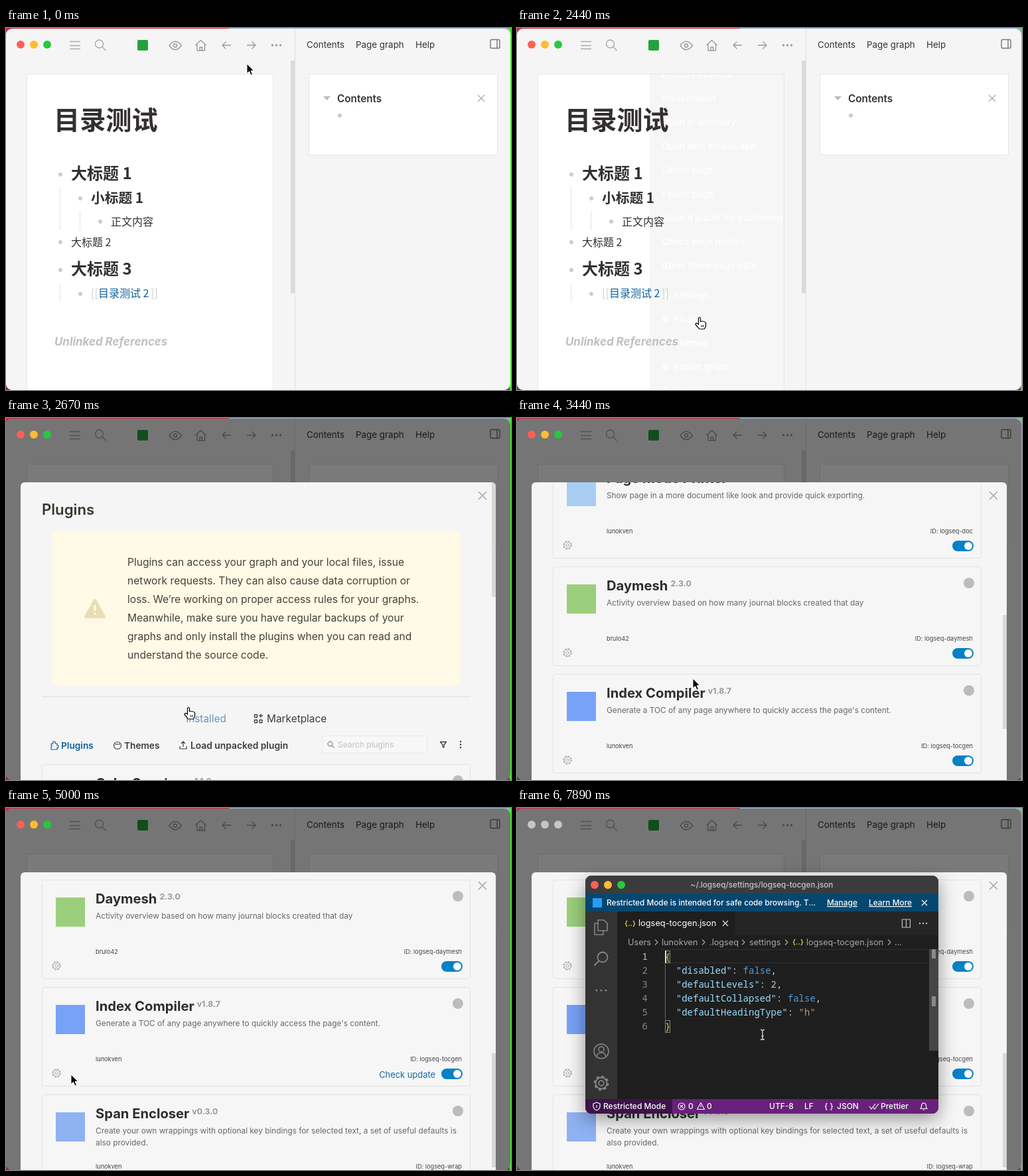
An HTML page that plays this animation: 761 by 546 pixels, repeating every 8 s.

```html
<!DOCTYPE html>
<html lang="zh-CN">
<head>
<meta charset="utf-8">
<style>
html, body { margin: 0; width: 100%; height: 100%; overflow: hidden; background: #f5f5f5; }
svg { display: block; width: 761px; height: 546px; }
text { font-family: Inter, "Noto Sans CJK SC", sans-serif; }
.zh { font-family: "Noto Sans CJK SC", "Noto Sans CJK", sans-serif; }
.mono { font-family: "Noto Sans Mono", monospace; }
#editor { filter: drop-shadow(0 8px 14px rgba(0, 0, 0, .4)); }
</style>
</head>
<body>
<script>
const $ = id => document.getElementById(id);

// Drawing helpers: each returns SVG markup.
const text = (x, y, size, fill, str, weight = 400, extra = '') =>
  `<text x="${x}" y="${y}" font-size="${size}" ${fill && `fill="${fill}"`} font-weight="${weight}" ${extra}>${str}</text>`;
const zh = (x, y, size, str, weight = 400, fill = '#332f33') => text(x, y, size, fill, str, weight, 'class="zh"');
const mono = (x, y, fill, str, extra = '') => text(x, y, 14, fill, str, 500, 'class="mono" ' + extra);
const rect = (x, y, w, h, fill, r = 0, extra = '') =>
  `<rect x="${x}" y="${y}" width="${w}" height="${h}" fill="${fill}" rx="${r}" ${extra}/>`;
const dot = (x, y, r, fill) => `<circle cx="${x}" cy="${y}" r="${r}" fill="${fill}"/>`;
const ring = (x, y, r, color, w = 1.4, extra = '') =>
  `<circle cx="${x}" cy="${y}" r="${r}" fill="none" stroke="${color}" stroke-width="${w}" ${extra}/>`;
const line = (d, color, w = 1.4, extra = '') =>
  `<path d="${d}" fill="none" stroke="${color}" stroke-width="${w}" stroke-linejoin="round" ${extra}/>`;
const cross = (x, y, r, color, w = 1.4) =>
  line(`M${x - r} ${y - r}l${2 * r} ${2 * r}m0 ${-2 * r}l${-2 * r} ${2 * r}`, color, w);
const gear = (x, y, r, color, w = 1.2) =>
  ring(x, y, r * .85, color, w) + ring(x, y, r, color, w * 1.5, `stroke-dasharray="${r * .4} ${r * .385}"`) + ring(x, y, r * .38, color, w);
// A negative side puts the handle at the lower left.
const lens = (x, y, r, color, w = 1.4, side = 1) =>
  ring(x, y, r, color, w) + line(`M${x + side * r * .7} ${y + r * .7}l${side * r} ${r}`, color, w);
const lights = (x, y, colors = ['#fe5f57', '#febc2e', '#28c840']) =>
  colors.map((c, i) => dot(x + 20 * i, y, 6, c)).join('');
const dots = (x, y, gap, r, color) => [-1, 0, 1].map(i => dot(x + i * gap, y, r, color)).join('');

function desktop() {
  return rect(0, 0, 336, 546, '#c0304a') + rect(336, 0, 425, 546, '#94aecb') +
    rect(0, 530, 761, 16, '#8f2440') + rect(759, 0, 2, 546, '#35ff20') +
    rect(0, 1, 760, 545, '#f5f5f5', 9);
}

function toolbar() {
  const c = '#9b9b9b';
  return line('M96 20.5h16M96 26.5h16M96 31.5h16', '#ababab', 1.3) + lens(140.5, 24, 6, '#ababab') +
    rect(198, 18, 16, 16, '#22a33c', 2) +
    line('M246 26.5Q255 14 264.5 26.5Q255 39 246 26.5Z', c) + ring(255, 26.5, 2.5, c) +
    line('M285.5 26l8-7.5 8 7.5M288 24.5v9.5h11.5v-9.5M292 34v-5h3.5v5', c) +
    line('M339 26h-13m5.5-5.5L326 26l5.5 5.5M363 26h13m-5.5-5.5L376 26l-5.5 5.5', c) +
    dots(407.5, 26, 6, 1.7, c) +
    text(453, 30, 13.4, '#333', 'Contents') + text(527, 30, 13.4, '#333', 'Page graph') + text(617, 30, 13.4, '#333', 'Help') +
    line('M732 17.5h10q2 0 2 2v9q0 2-2 2h-10q-2 0-2-2v-9q0-2 2-2M740 17.5v13', '#777');
}

function sidebar() {
  return line('M435.5 1v545', '#e0e0e0', 1) + rect(429, 49, 6, 351, '#dadada') +
    rect(456.5, 69.5, 284, 122, '#fff', 0, 'stroke="#e6e6e6"') +
    '<path d="M478 103h11l-5.5 6z" fill="#bbb"/>' + text(499, 112, 15.3, '#333', 'Contents', 600) +
    cross(716, 106, 5, '#aaa', 1.2) + dot(503, 132, 3, '#ccc');
}

function notes() {
  const bullets = [[82, 221], [112, 257], [142, 292], [82, 323], [82, 365], [112, 401]];
  return zh(72, 153, 39.2, '目录测试', 700) + bullets.map(([x, y]) => dot(x, y, 3, '#ccc')).join('') +
    line('M81.5 240v65M111.5 276v29M81.5 386v28', '#e4e4e4', 1) +
    zh(98, 228, 24, '大标题 1', 700) + zh(128, 263.5, 20.7, '小标题 1', 700) + zh(158, 298, 16, '正文内容') +
    zh(98, 329, 16, '大标题 2') + zh(98, 372, 24, '大标题 3', 700) +
    zh(128, 406, 16, '[[', 400, '#ccc') + zh(139, 406, 16, '目录测试 2', 400, '#10609c') + zh(218, 406, 16, ']]', 400, '#ccc') +
    text(73, 479, 16.9, '#c0c0c0', 'Unlinked References', 700, 'font-style="italic"');
}

// Text in the menu inherits its colour from the <use> element.
function menu() {
  const actions = ['Add to Favorites', 'Presentation', 'Open in directory', 'Open with default app', 'Delete page',
    'Export page', 'Make it public for publishing', 'Check page history', '(Dev) Show page data'];
  const tools = ['Settings', 'Plugins', 'Themes', 'Export graph', 'Import'];
  return rect(200, 46, 227, 520, '#f6f6f6', 4) +
    actions.map((s, i) => text(218, 75 + 36 * i, 13.5, '', s, 500)).join('') +
    '<rect x="200" y="380" width="227" height="1" opacity=".4"/>' +
    tools.map((s, i) => `<rect x="219" y="${398 + 36 * i}" width="10" height="10" rx="3" opacity=".6"/>` +
      text(236, 408 + 36 * i, 13.5, '', s, 500)).join('');
}

function pluginHeader() {
  const warning = ['Plugins can access your graph and your local files, issue',
    'network requests. They can also cause data corruption or', 'loss. We’re working on proper access rules for your graphs.',
    'Meanwhile, make sure you have regular backups of your', 'graphs and only install the plugins when you can read and',
    'understand the source code.'];
  const blue = '#10609c', ink = '#3c3c3c';
  return text(54, 146, 22.2, '#3a372f', 'Plugins', 600) + rect(70, 170, 615, 234, '#fff9e5', 3) +
    '<path d="M134 275l14 25h-28z" fill="#eadcb4" stroke="#eadcb4" stroke-width="4" stroke-linejoin="round"/>' +
    line('M134 282v9m0 3v3', '#fff9e5', 3) +
    warning.map((s, i) => text(183, 223 + 28 * i, 15.6, '#45423c', s)).join('') +
    line('M54 420.5h646', '#dedede', 1) + text(271, 459, 15.4, '#6c95bd', 'Installed') +
    line('M374.5 447.5h4v4h-4zM374.5 455.5h4v4h-4zM382 455.5h4v4h-4zM384 446v6m-3-3h6', ink, 1.3) +
    text(393, 459, 15.4, ink, 'Marketplace') +
    line('M68 491h3q-1-4 2-3 2 0 1 3h3v3q3-1 2 2 0 2-2 1v3h-9v-4q3-2 0-3z', blue, 1.2) + text(83, 499, 13.7, blue, 'Plugins', 600) +
    ring(168, 494, 5.5, ink, 1.2) + dots(168, 492, 2.5, .9, ink) + text(178, 499, 13.7, ink, 'Themes', 600) +
    line('M262 495v4h10v-4M267 496v-8m-3 3l3-3 3 3', ink, 1.2) + text(278, 499, 13.8, ink, 'Load unpacked plugin', 600) +
    rect(477.5, 479.5, 157, 26, '#f7f7f7', 3, 'stroke="#e8e8e8"') + lens(488.5, 491.5, 3.5, '#999') +
    text(500, 497, 12, '#c0c0c0', 'Search plugins') +
    line('M654.5 488.5h9l-3.5 4.5v4l-2-1v-3z', ink, 1.3) + [488, 492.5, 497].map(y => dot(685, y, 1.2, ink)).join('');
}

const CARD_TOP = 522, CARD_STEP = 162;
const plugins = [
  ['#9a9a9a', 'Calm Sessions', '1.1.2', ['Keep a set of open pages and come back to them later.'], 'brulo42', 'logseq-calm'],
  ['#a9cdf2', 'Page Mode Printer', '1.4.0', ['Show page in a more document like look and provide quick exporting.'], 'lunokven', 'logseq-doc'],
  ['#9ccf7c', 'Daymesh', '2.3.0', ['Activity overview based on how many journal blocks created that day'], 'brulo42', 'logseq-daymesh'],
  ['#78a2f8', 'Index Compiler', 'v1.8.7', ["Generate a TOC of any page anywhere to quickly access the page's content."], 'lunokven', 'logseq-tocgen'],
  ['#8fb2f2', 'Span Encloser', 'v0.3.0', ['Create your own wrappings with optional key bindings for selected text, a set of useful defaults is', 'also provided.'], 'lunokven', 'logseq-wrap'],
];

function pluginCard([color, name, version, lines, author, id], i) {
  return `<g transform="translate(0 ${CARD_TOP + CARD_STEP * i})">` +
    rect(54.5, .5, 645, 149, '#f6f6f6', 4, 'stroke="#e2e2e2"') + rect(75, 27, 44, 44, color) +
    text(135, 36, 20.2, '#2e2e2e', `${name}<tspan dx="4" dy="-6" font-size="12.3" fill="#999">${version}</tspan>`, 700) +
    lines.map((s, n) => text(135, 59 + 18 * n, 11.83, '#686868', s)).join('') +
    text(135, 112, 9.2, '#444', author) + text(687, 112, 9.2, '#444', 'ID: ' + id, 400, 'text-anchor="end"') +
    gear(76, 130, 6, '#aaa', 1) + dot(681, 25, 8, '#bcbcbc') +
    rect(656, 123, 32, 16, '#0581c7', 8) + dot(680, 131, 6, '#fff') +
    text(647, 137, 12.9, '#106ba3', 'Check update', 400, `id="update${i}" text-anchor="end"`) + '</g>';
}

function dropdown() {
  return rect(64, 408, 122, 76, '#f7f7f7', 3, 'style="filter:drop-shadow(0 1px 1px #0003)"') + gear(76, 400, 6, '#333', 1) +
    ['Open settings', 'Open package', 'Uninstall'].map((s, i) => text(71, 424 + 25 * i, 10.7, '#444', s, 600, `id="option${i}"`)).join('');
}

function editor() {
  const file = 'logseq-tocgen.json', grey = '#a9a9a9', icon = '#858585';
  const json = (x, y) => text(x, y, 11, '#cbcb41', '{..}', 600);
  const crumbs = [[167, 'Users'], [218, 'lunokven'], [290, '.logseq'], [350, 'settings'], [436, file], [569, '...']];
  return '<clipPath id="frame">' + rect(103, 102, 532, 359, '#000', 9) + '</clipPath><g clip-path="url(#frame)">' +
    rect(103, 102, 532, 359, '#1e1e1e') + rect(103, 102, 532, 27, '#3b3b3d') + lights(117, 116) +
    text(369, 120, 11.7, '#c8c8c8', '~/.logseq/settings/' + file, 500, 'text-anchor="middle"') +
    rect(103, 129, 532, 27, '#06476f') + rect(114, 136, 14, 14, '#2a9df4') +
    text(135, 147, 11.8, '#fff', 'Restricted Mode is intended for safe code browsing. T...', 500) +
    text(467, 147, 11.9, '#fff', 'Manage', 500, 'text-decoration="underline"') +
    text(530, 147, 11.9, '#fff', 'Learn More', 500, 'text-decoration="underline"') + cross(614, 143, 4, '#fff', 1.2) +
    rect(103, 156, 48, 283, '#333') + rect(329, 156, 306, 36, '#252526') +
    line('M122 169h9l5 5v11h-14zM122 174h-5v17h13v-6', icon, 1.6) + lens(129, 225, 7.5, icon, 1.8, -1) +
    dots(127, 275, 7, 1.6, icon) + ring(127, 367, 11, icon, 1.6) + ring(127, 364, 4, icon, 1.6) +
    line('M120 375q1-6 7-6t7 6', icon, 1.6) + gear(127, 415, 10, icon, 1.8) +
    json(162, 178) + text(183, 178, 12.8, '#fff', file) + cross(314, 174, 4, '#ddd', 1.3) +
    line('M580.5 168h12v12h-12zM586.5 168v12', '#c5c5c5', 1.2) + dots(612, 174, 5, 1.2, '#c5c5c5') +
    crumbs.map(([x, s]) => text(x, 207, 12.7, grey, s)).join('') + json(415, 206) +
    [208, 279, 339, 404, 559].map(x => line(`M${x} 198.5l4 4-4 4`, grey, 1.1)).join('') +
    rect(217, 213, 405, 1, '#303030') + rect(217, 233, 405, 1, '#303030') +
    rect(621, 213, 14, 153, '#454545') + rect(625, 213, 6, 14, '#8a8a8a') + rect(625, 284, 6, 15, '#8a8a8a') +
    `<g id="code">${code()}</g>` + statusBar() + '</g>';
}

function code() {
  const gold = '#ffd700';
  const entries = [['disabled', 'false', '#569cd6'], ['defaultLevels', '2', '#b5cea8'],
    ['defaultCollapsed', 'false', '#569cd6'], ['defaultHeadingType', '"h"', '#ce9178']];
  return [1, 2, 3, 4, 5, 6].map(n => mono(197, 208 + 21 * n, n > 1 ? '#858585' : '#c6c6c6', n, 'text-anchor="end"')).join('') +
    [215, 320].map(y => rect(223.5, y + .5, 7, 18, 'none', 0, 'stroke="#888"')).join('') +
    mono(223, 229, gold, '{') + mono(223, 334, gold, '}') + rect(223, 235, 1, 84, '#7d6a26') + rect(223, 215, 2, 19, '#ddd') +
    entries.map(([key, value, color], i) => mono(239.8, 250 + 21 * i, '#d4d4d4',
      `<tspan fill="#9cdcfe">"${key}"</tspan>: <tspan fill="${color}">${value}</tspan>${i < 3 ? ',' : ''}`)).join('');
}

function statusBar() {
  const label = (x, s) => text(x, 454, 12, '#fff', s, 500);
  return rect(103, 439, 532, 22, '#68217a') + rect(103, 439, 131, 22, '#3d1449') +
    line('M120 444l5 2v4q0 4-5 6-5-2-5-6v-4zM120 448v4', '#fff', 1.2) + label(130, 'Restricted Mode') +
    ring(248, 450, 5, '#fff', 1.1) + cross(248, 450, 2, '#fff', 1.1) + label(258, '0') +
    line('M277 444.5l5.5 10h-11zM277 448v3', '#fff', 1.1) + label(286, '0') +
    label(380, 'UTF-8') + label(433, 'LF') + label(463, '{ }') + label(482, 'JSON') +
    line('M531 450l3 4 6-8M537 452l2 2 6-8', '#fff', 1.2) + label(548, 'Prettier') +
    line('M608 453.5h10l-1.5-2.5v-3q-1-3-3.5-3t-3.5 3v3zM612 455.5h2', '#fff', 1.1);
}

function cursors() {
  return '<g id="arrow"><path d="M0 0v14.5l3.5-3 2.5 5.5 2.5-1-2.5-5.5h4.5z" fill="#000" stroke="#fff"/></g>' +
    '<g id="hand"><path d="M-1.5 1.5q1.5-2 3 0v5q6-1 8 2v5l-2 4.5h-8q-3-4-5.5-7 0-2 2-2l2.5 2z" fill="#fff" stroke="#000" stroke-width="1.2"/>' +
    line('M3 12v3m2.5-3v3', '#000', 1) + '</g>' +
    `<g id="beam">${line('M-3-7.5q3 0 3 2v11q0 2-3 2M3-7.5q-3 0-3 2m0 11q0 2 3 2M-1.5 2h3', '#ddd', 1.3)}</g>`;
}

document.body.innerHTML = `<svg viewBox="0 0 761 546">
<defs><g id="menu">${menu()}</g>
<clipPath id="page">${rect(32, 70, 370, 476, '#000')}</clipPath>
<clipPath id="panel">${rect(22, 97, 716, 460, '#000', 6)}</clipPath></defs>
${desktop()}${toolbar()}${sidebar()}
${rect(31.5, 69.5, 371, 490, '#fff', 0, 'stroke="#e5e5e5"')}
<g clip-path="url(#page)"><use href="#menu" id="fadedMenu" fill="#fff"/></g>
${notes()}
<g id="openMenu"><use href="#menu" fill="#333"/>${rect(200, 0, 227, 35, '#000', 0, 'id="menuRow" opacity=".06"')}</g>
<g id="modal">${rect(0, 1, 760, 545, '#000', 9, 'opacity=".52"')}
${rect(22, 97, 716, 460, '#f5f5f5', 6)}
<g clip-path="url(#panel)"><g id="list">${pluginHeader()}${plugins.map(pluginCard).join('')}</g>
${rect(732, 98, 6, 172, '#d9d8d4', 0, 'id="thumb"')}</g>
${cross(718, 117, 6, '#aaa', 1.6)}</g>
<g id="active">${lights(22, 25)}</g>
<g id="inactive">${lights(22, 25, ['#c6c6c6', '#c6c6c6', '#c6c6c6'])}</g>
<g id="dropdown">${dropdown()}</g>
<g id="editor">${editor()}</g>
<g id="cursor">${cursors()}</g>
</svg>`;

// Keys are [time, ...values]; values ease from one key to the next.
const pointerKeys = [[110, 363, 54], [780, 406, 24], [1000, 406, 24], [1670, 275, 436], [2700, 275, 436], [3300, 265, 393],
  [4440, 265, 393], [4940, 98, 402], [5000, 98, 402], [5300, 76, 402], [5400, 76, 402], [5890, 98, 419], [7280, 98, 419], [7850, 370, 342]];
const scrollKeys = [[2740, 0, 98], [3420, 622, 297], [3640, 622, 297], [4300, 784, 370], [4530, 784, 370], [4900, 738, 370]];

const ramp = (t, from, to) => Math.min(1, Math.max(0, (t - from) / (to - from)));
function track(keys, t) {
  const next = keys.findIndex(k => k[0] > t);
  if (next === 0) return keys[0].slice(1);
  if (next < 0) return keys.at(-1).slice(1);
  const a = keys[next - 1], b = keys[next], p = ramp(t, a[0], b[0]), e = p * p * (3 - 2 * p);
  return a.slice(1).map((v, i) => v + (b[i + 1] - v) * e);
}
const show = (id, on) => { $(id).style.display = on ? '' : 'none'; };
const attr = (id, name, value) => $(id).setAttribute(name, value);

function draw(t) {
  const [x, y] = track(pointerKeys, t), [scroll, thumb] = track(scrollKeys, t);
  const opening = ramp(t, 6780, 7000), inEditor = t > 7280 && x > 151;

  show('openMenu', t >= 1000 && t < 2380);
  show('fadedMenu', t >= 2380 && t < 2600);
  const row = Math.floor((y - (y > 380 ? 385 : 52)) / 36);
  show('menuRow', row >= 0);
  attr('menuRow', 'y', (y > 380 ? 386 : 52) + 36 * row);

  attr('modal', 'opacity', ramp(t, 2550, 2660));
  show('modal', t > 2550);
  attr('list', 'transform', `translate(0 ${-scroll})`);
  attr('thumb', 'y', thumb);
  const hovered = t > 4200 && t < 6890 ? Math.floor((y + scroll - CARD_TOP) / CARD_STEP) : -1;
  plugins.forEach((_, i) => show('update' + i, i === hovered));

  show('dropdown', t >= 5220 && t < 6780);
  attr('option0', 'fill', t >= 6440 ? '#222' : '#444');
  show('active', t < 6890);
  show('inactive', t >= 6890);

  show('editor', opening > 0);
  attr('editor', 'opacity', opening);
  attr('editor', 'transform', `translate(369 281) scale(${.8 + .2 * opening}) translate(-369 -281)`);
  show('code', t >= 7330);

  const shape = inEditor ? 'beam' : t > 700 && t < 2780 ? 'hand' : 'arrow';
  for (const id of ['arrow', 'hand', 'beam']) show(id, id === shape);
  attr('cursor', 'transform', `translate(${x} ${y})`);
}

function tick() {
  draw(performance.now() % 8000);
  requestAnimationFrame(tick);
}
tick();
</script>
</body>
</html>
```
